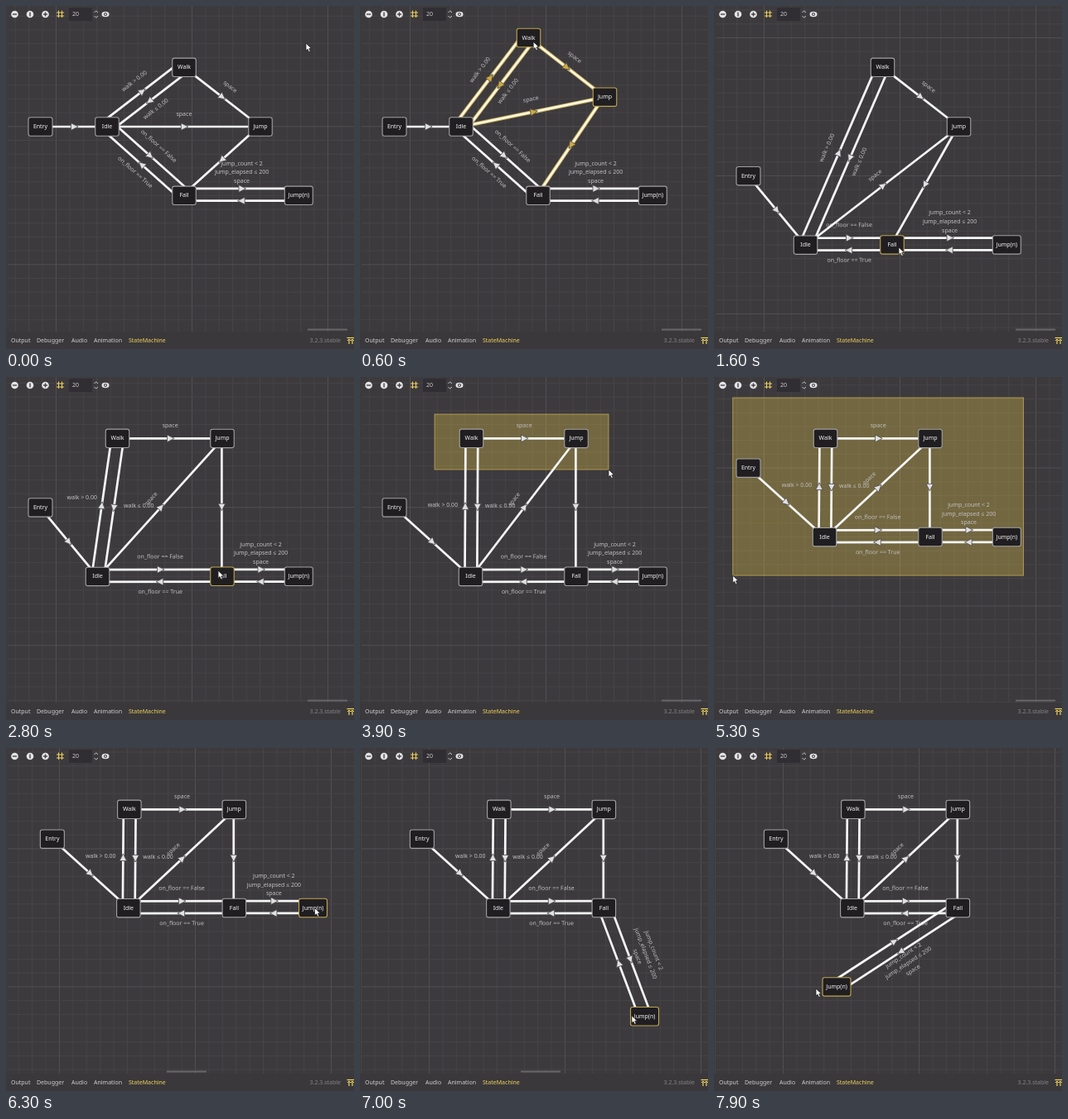
An HTML page with a canvas for the animation above (8000 ms loop, 420 by 415 pixels).

```html
<!DOCTYPE html>
<html lang="en">
<head>
<meta charset="utf-8">
<title>State machine editor</title>
<style>
html, body { margin: 0; height: 100%; overflow: hidden; background: #3c3a3d; }
canvas { display: block; width: 420px; height: 415px; }
</style>
</head>
<body>
<canvas id="stage"></canvas>
<script>
const LOOP = 8000, W = 420, H = 415, FLOOR = 394;
const STEP_X = 11.5, STEP_Y = 11.93, TOP = 74.3, SCROLL_DELAY = 60;
const BG = '#3c3a3d', LIGHT = '#e4e3e5', YELLOW = '#f2d45c', GOLD = '#bfa553';
const FONT = '7px "Noto Sans", "Open Sans", sans-serif';

const canvas = document.getElementById('stage');
const dpr = window.devicePixelRatio || 1;
canvas.width = W * dpr;
canvas.height = H * dpr;
const ctx = canvas.getContext('2d');

const nodes = {
  Entry: { x: 41.5, y: 146, w: 29 },
  Idle: { x: 122, y: 146, w: 28.5 },
  Walk: { x: 215, y: TOP, w: 28.5 },
  Jump: { x: 307, y: 146, w: 28.5 },
  Fall: { x: 215, y: 229.3, w: 28.5 },
  'Jump(n)': { x: 353.3, y: 229.3, w: 34 }
};
const ALL = Object.keys(nodes);

const edges = [
  ['Entry', 'Idle'],
  ['Idle', 'Walk', 'walk > 0.00'],
  ['Walk', 'Idle', 'walk ≤ 0.00'],
  ['Idle', 'Jump', 'space'],
  ['Walk', 'Jump', 'space'],
  ['Jump', 'Fall'],
  ['Idle', 'Fall', 'on_floor == False'],
  ['Fall', 'Idle', 'on_floor == True'],
  ['Fall', 'Jump(n)', 'jump_count < 2', 'jump_elapsed ≤ 200', 'space'],
  ['Jump(n)', 'Fall']
];

// A gesture drags nodes by grid steps, after an optional rubber band selection.
const drag = (names, start, end, dx, dy, more) =>
  ({ names, start, end, dx: dx * STEP_X, dy: dy * STEP_Y, grip: [0, -1], scroll: 0, ...more });
const gestures = [
  drag(['Walk', 'Jump'], 450, 750, -1, -5, { band: [362, 45, 192, 165] }),
  drag(['Idle'], 1130, 1450, -1, 7),
  drag(['Fall'], 1560, 1750, 0, 0, { grip: [8, 3] }),
  drag(['Walk'], 1930, 2150, -6, 4),
  drag(['Jump'], 2280, 2480, -3, -2),
  drag(['Fall'], 2580, 2780, 4, 0, { grip: [-2, -7] }),
  drag(['Idle'], 3030, 3300, 2, 0),
  drag(['Walk', 'Jump'], 4050, 4330, 0, 4, { band: [90, 45, 300, 112] }),
  drag(ALL, 5600, 5850, 0.9, -1, { band: [373.5, 25, 2.5, 252.5], scroll: 4 }),
  drag(['Jump(n)'], 6150, 6300, 0.25, 0, { grip: [2, 0] }),
  drag(['Jump(n)'], 6400, 6800, -4, 11, { scroll: 19 }),
  drag(['Jump(n)'], 7550, 7850, -17, -3)
];
const BAND_TIME = 600, BAND_GAP = 80;
gestures.forEach((g, i) => {
  if (!g.band) g.begin = g.start;
  else g.begin = Math.max(100, g.start - (g.names === ALL ? 900 : BAND_TIME));
  g.picked = g.band ? g.start - BAND_GAP : g.start;
  if (i) gestures[i - 1].dropped = g.begin;
});
const MOVE_ALL = gestures.find(g => g.names === ALL);

function progress(t, a, b) {
  const k = Math.min(1, Math.max(0, (t - a) / (b - a)));
  return k * k * (3 - 2 * k);
}
function snapped(k, total, step) {
  const n = Math.max(1, Math.round(Math.abs(total) / step));
  return Math.round(k * n) * total / n;
}

// After each release the view scrolls so that the topmost node sits at TOP.
function stateAt(t) {
  const view = { x: 0, y: 0 }, layout = {};
  let active = null;
  for (const name of ALL) layout[name] = { ...nodes[name] };
  for (const g of gestures) {
    const k = progress(t, g.start, g.end);
    for (const name of g.names) {
      layout[name].x += snapped(k, g.dx, STEP_X);
      layout[name].y += snapped(k, g.dy, STEP_Y);
    }
    if (t >= g.end + SCROLL_DELAY) {
      view.x += g.scroll;
      view.y = TOP - Math.min(...ALL.map(name => layout[name].y));
    }
    if (t >= g.picked && !(t >= g.dropped)) active = g;
  }
  for (const p of Object.values(layout)) { p.x += view.x; p.y += view.y; }
  if (active) for (const name of active.names) {
    layout[name].selected = true;
    layout[name].glow = active.names.length > 1;
  }
  const settled = active && active.names.length > 1 && t >= active.end + SCROLL_DELAY;
  return { view, layout, settled };
}

// The pointer visits every band corner and every grabbed node.
const pointer = [{ t: 0, x: 362, y: 45 }];
for (const g of gestures) {
  if (g.band) {
    const [x0, y0, x1, y1] = g.band;
    pointer.push({ t: g.begin, x: x0, y: y0 }, { t: g.picked - 120, x: x1, y: y1 }, { t: g.picked, x: x1, y: y1 });
  }
  const held = g.names === ALL ? 'Jump' : g.names[0];
  for (const t of [g.start, g.end]) {
    const p = stateAt(t).layout[held];
    pointer.push({ t, x: p.x + g.grip[0], y: p.y + g.grip[1] });
  }
}
pointer.push({ t: 7900, x: 123, y: 291 }, { t: LOOP + 1, x: 123, y: 291 });

function pointerAt(t) {
  const i = pointer.findIndex(p => p.t > t), a = pointer[i - 1], b = pointer[i];
  const k = progress(t, a.t, b.t);
  return [a.x + (b.x - a.x) * k, a.y + (b.y - a.y) * k];
}

function text(str, x, y, color, align = 'left') {
  ctx.font = FONT;
  ctx.fillStyle = color;
  ctx.textAlign = align;
  ctx.textBaseline = 'middle';
  ctx.fillText(str, x, y);
}
function trace(pts) {
  ctx.beginPath();
  for (let i = 0; i < pts.length; i += 2) ctx.lineTo(pts[i], pts[i + 1]);
}
function line(color, width, ...pts) {
  trace(pts);
  ctx.strokeStyle = color;
  ctx.lineWidth = width;
  ctx.stroke();
}
function polygon(fill, stroke, ...pts) {
  trace(pts);
  ctx.closePath();
  ctx.fillStyle = fill;
  ctx.fill();
  ctx.strokeStyle = stroke;
  ctx.lineWidth = 0.8;
  ctx.stroke();
}
function oval(x, y, rx, ry, color) {
  ctx.fillStyle = color;
  ctx.beginPath();
  ctx.ellipse(x, y, rx, ry, 0, 0, 7);
  ctx.fill();
}

function drawGrid(view) {
  const rule = (origin, major, size, draw) => {
    const step = major / 10;
    for (let i = Math.ceil(-origin / step); origin + i * step < size; i++)
      draw(origin + i * step, i % 10 ? '#464447' : '#514f52');
  };
  rule(224.5 + view.x, 164, W, (x, c) => line(c, 1, x, 0, x, FLOOR));
  rule(145.8 + view.y, 167, FLOOR, (y, c) => line(c, 1, 2, y, W, y));
}

function edgeShape([from, to, ...label], layout) {
  const a = layout[from], b = layout[to];
  const dx = b.x - a.x, dy = b.y - a.y, len = Math.hypot(dx, dy) || 1;
  const nx = dy / len, ny = -dx / len;
  const paired = edges.some(e => e[0] === to && e[1] === from);
  const side = paired ? 7.4 : -1;
  const ox = nx * side + 0.4, oy = ny * side - 1;
  return {
    x0: a.x + ox, y0: a.y + oy, x1: b.x + ox, y1: b.y + oy,
    mx: (a.x + b.x) / 2 + ox, my: (a.y + b.y) / 2 + oy,
    dx, nx, ny, label, angle: Math.atan2(dy, dx), glow: a.glow || b.glow
  };
}

// Labels follow their edge, but stay level beside a steep one.
function drawLabel({ mx, my, dx, nx, ny, angle, label }) {
  if (!label.length) return;
  const extra = (label.length - 1) * 2, tilt = Math.abs(ny);
  ctx.save();
  ctx.translate(mx, my);
  if (tilt < 0.17) {
    ctx.font = FONT;
    const reach = Math.max(...label.map(s => ctx.measureText(s).width)) / 2 + 9;
    ctx.translate(nx * reach + 22 * tilt, ny * reach - 1 - 36 * tilt);
  } else {
    ctx.rotate(dx < 0 ? angle + Math.PI : angle);
    ctx.translate(0, dx < 0 ? 12.2 + extra : -15.5 - extra);
  }
  label.forEach((s, i) => text(s, 0, (i - (label.length - 1) / 2) * 10.6, '#c2c0c3', 'center'));
  ctx.restore();
}

function drawEdge(e) {
  if (e.glow) line(GOLD, 4.6, e.x0, e.y0, e.x1, e.y1);
  line(e.glow ? '#fff8e0' : '#f6f6f6', 2.7, e.x0, e.y0, e.x1, e.y1);
  ctx.save();
  ctx.translate(e.mx, e.my);
  ctx.rotate(e.angle);
  polygon(e.glow ? '#d0ac3c' : '#e2e1e2', '#4a484c', -3.6, -4.3, 5, 0, -3.6, 4.3);
  ctx.restore();
}

function drawNode(name, { x, y, w, selected }) {
  ctx.beginPath();
  ctx.roundRect(x - w / 2, y - 11.2, w, 22.4, 2.5);
  ctx.fillStyle = '#201e21';
  ctx.fill();
  ctx.lineWidth = 1.1;
  ctx.strokeStyle = selected ? GOLD : '#a3a1a4';
  ctx.stroke();
  text(name, x, y, '#f4f4f4', 'center');
}

function drawBand(t) {
  const g = gestures.find(g => g.band && t >= g.begin && t < g.picked);
  if (!g) return;
  const [x0, y0, x1, y1] = g.band, k = progress(t, g.begin, g.picked - 120);
  const rect = [x0, y0, (x1 - x0) * k, (y1 - y0) * k];
  ctx.fillStyle = 'rgba(255,220,72,.28)';
  ctx.fillRect(...rect);
  ctx.strokeStyle = 'rgba(225,195,90,.6)';
  ctx.lineWidth = 1;
  ctx.strokeRect(...rect);
}

function drawToolbar() {
  const y = 10;
  for (const x of [10.5, 29, 47.5]) {
    oval(x, y, 4.3, 4.3, LIGHT);
    if (x !== 29) line(BG, 1.3, x - 2.5, y, x + 2.5, y);
    if (x !== 10.5) line(BG, 1.3, x, y - 2.5, x, y + 2.5);
  }
  for (const d of [0, 4]) {
    line(YELLOW, 1, 63.5 + d, 5.5, 63.5 + d, 14);
    line(YELLOW, 1, 61, 8 + d, 70, 8 + d);
  }
  ctx.fillStyle = '#302e32';
  ctx.fillRect(76, 2, 28, 16);
  text('20', 80, y, '#d0cfd1');
  for (const s of [-1, 1]) line('#c4c3c5', 1, 106.5, y + 2 * s, 108.7, y + 4.2 * s, 111, y + 2 * s);
  oval(120, y, 4.5, 3.2, LIGHT);
  oval(120, y, 2, 2, BG);
  oval(120, y, 1, 1, LIGHT);
}

function drawBottom(t, settled) {
  const y = 405, x = settled ? 361 : 366.5;
  ctx.fillStyle = '#3a383b';
  ctx.fillRect(0, FLOOR, W, H - FLOOR);
  const tabs = { Output: 6, Debugger: 37, Audio: 79, Animation: 106, StateMachine: 148 };
  for (const name in tabs) text(name, tabs[name], y, name === 'StateMachine' ? YELLOW : '#cfced0');
  text('3.2.3.stable', x, y, '#858387');
  line(YELLOW, 1.2, x + 45, y - 3.5, x + 54, y - 3.5);
  for (const px of [x + 47.5, x + 51.5]) {
    line(YELLOW, 1.2, px, y - 2, px, y + 4);
    line(YELLOW, 1, px - 2, y, px, y - 2, px + 2, y);
  }
  const bar = t >= MOVE_ALL.end ? 194 : settled ? 312 : 364;
  if (t < gestures.at(-1).start) line('#69676b', 2, bar, 391.5, bar + 48, 391.5);
}

function drawPointer(x, y) {
  ctx.save();
  ctx.translate(x, y);
  polygon('#fff', '#222', 0, 0, 0, 9, 2, 7.2, 3.6, 10.6, 5.3, 9.8, 3.8, 6.6, 6.6, 6.4);
  ctx.restore();
}

function draw(t) {
  ctx.setTransform(dpr, 0, 0, dpr, 0, 0);
  ctx.fillStyle = BG;
  ctx.fillRect(0, 0, W, H);
  const { view, layout, settled } = stateAt(t);
  drawGrid(view);
  drawBand(t);
  const shapes = edges.map(e => edgeShape(e, layout));
  shapes.forEach(drawLabel);
  shapes.forEach(drawEdge);
  for (const name of ALL) drawNode(name, layout[name]);
  drawToolbar();
  drawBottom(t, settled);
  drawPointer(...pointerAt(t));
}

function tick() {
  draw(performance.now() % LOOP);
  requestAnimationFrame(tick);
}
tick();
</script>
</body>
</html>
```
